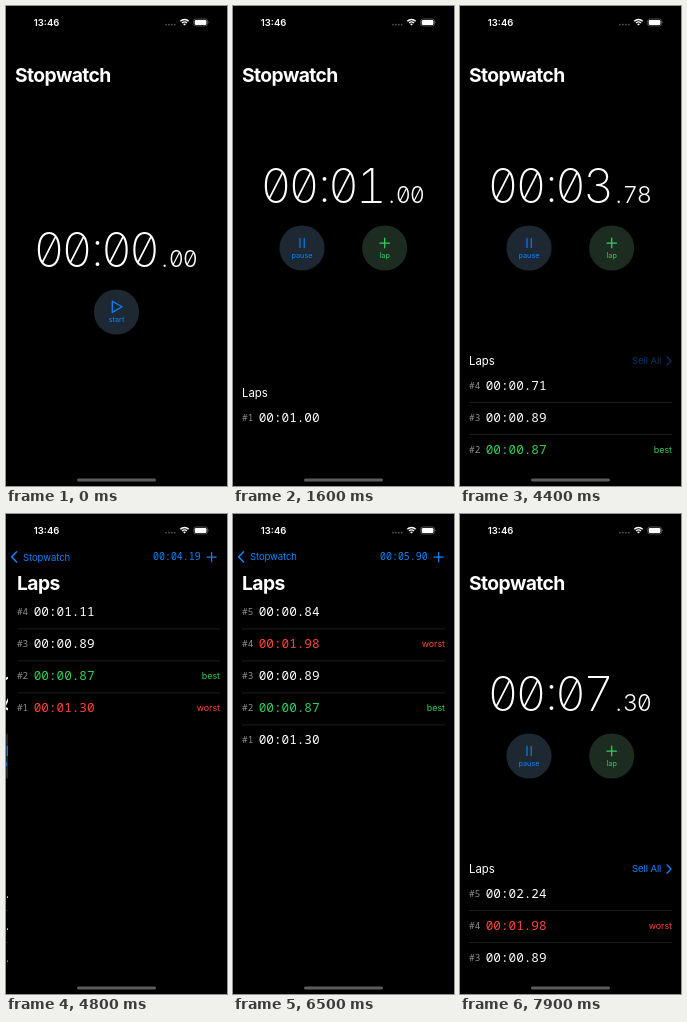
An HTML page for the animation above (8000 ms loop, 221 px wide and 480 px high).

```html
<!DOCTYPE html>
<html lang="en">
<head>
<meta charset="utf-8">
<title>Stopwatch</title>
<style>
  html, body { margin: 0; width: 100%; height: 100%; overflow: hidden; background: #000; }
  svg { display: block; width: 100%; height: 100%; }
  text { font-family: Inter, "Open Sans", sans-serif; fill: #fff; white-space: pre; }
  .mono { font-family: "Noto Sans Mono", "DejaVu Sans Mono", monospace; }
  .digit { text-anchor: middle; font-feature-settings: "zero", "tnum"; }
  .big { font-size: 48px; font-weight: 250; }
  .small { font-size: 23.4px; font-weight: 300; }
  .title { font-size: 19.3px; font-weight: 700; letter-spacing: -.03em; }
  .heading { font-size: 11.4px; }
  .body { font-size: 9.5px; letter-spacing: -.01em; }
  .label { font-size: 7.3px; text-anchor: middle; }
  .lap { font-size: 12.7px; }
  .index { font-size: 9.4px; fill: #8e8e93; }
  .tag { font-size: 8.9px; text-anchor: end; }
  .clock { font-size: 9.5px; font-weight: 600; }
  .blue { fill: #0a84ff; }
  .green { fill: #30d158; }
  .red { fill: #ff453a; }
  .line { fill: none; stroke-linecap: round; stroke-linejoin: round; stroke-width: 1.25; }
  .blueLine { stroke: #0a84ff; }
  .greenLine { stroke: #30d158; }
  .rule { stroke: #242426; stroke-width: .8; }
</style>
</head>
<body>
<svg id="stage" viewBox="0 0 221 480"></svg>
<script>
const WIDTH = 221, LOOP = 8000, STEP = 100;
const START = 600, PRESS_START = 500;
const PRESS_ALL = 4400, PUSH = 4430;
const PRESS_BACK = 6700, POP = 6770;

// Loop time against stopwatch reading, both in ms
const CLOCK = [[600, 0], [1600, 1005], [2800, 2181], [4400, 3786], [4800, 4192], [6500, 5902], [7900, 7302]];
const LAP_STARTS = [0, 1305, 2183, 3075, 5060];

const clamp = v => Math.min(1, Math.max(0, v));
const mix = (a, b, p) => a + (b - a) * p;
const easeInOut = p => p * p * (3 - 2 * p);
const pad = n => String(n).padStart(2, '0');

// Critically damped spring
function spring(ms) {
  const x = Math.max(0, ms) * 0.01826;
  return 1 - (1 + x) * Math.exp(-x);
}

function elapsedAt(t) {
  if (t <= START) return 0;
  const i = Math.max(1, CLOCK.findIndex(([time]) => t <= time));
  const [t0, e0] = CLOCK[i - 1], [t1, e1] = CLOCK[i];
  return mix(e0, e1, (t - t0) / (t1 - t0));
}

function format(ms) {
  const cs = Math.floor(ms / 10);
  return `${pad(Math.floor(cs / 6000))}:${pad(Math.floor(cs / 100) % 60)}.${pad(cs % 100)}`;
}

const text = (x, y, str, cls, extra = '') => `<text x="${x}" y="${y}" class="${cls}" ${extra}>${str}</text>`;
const line = (d, cls, extra = '') => `<path d="${d}" class="line ${cls}" ${extra}/>`;
const group = (body, x = 0, y = 0, opacity = 1, scale = 1) =>
  opacity <= 0 ? '' : `<g transform="translate(${x} ${y}) scale(${scale})" opacity="${opacity}">${body}</g>`;
const plus = (x, y, r, cls) => line(`M${x - r} ${y}h${2 * r}M${x} ${y - r}v${2 * r}`, cls);

// Newest lap first, with best and worst among the finished ones
function lapsAt(elapsed) {
  const laps = LAP_STARTS.filter(s => s <= elapsed).map((s, i) => {
    const end = LAP_STARTS[i + 1];
    const done = end <= elapsed;
    return { index: i + 1, time: (done ? end : elapsed) - s, done };
  });
  const times = laps.filter(l => l.done).map(l => l.time);
  if (times.length > 1) {
    for (const lap of laps.filter(l => l.done)) {
      if (lap.time === Math.min(...times)) Object.assign(lap, { tag: 'best', color: 'green' });
      if (lap.time === Math.max(...times)) Object.assign(lap, { tag: 'worst', color: 'red' });
    }
  }
  return laps.reverse();
}

function lapRows(laps, top) {
  return laps.map((lap, i) => {
    const y = top + i * 32;
    const color = lap.color || '';
    return text(9, y + 3.4, '#' + lap.index, 'mono index') +
      text(25.7, y + 4.6, format(lap.time), `mono lap ${color}`) +
      (lap.tag ? text(212, y + 3.2, lap.tag, `tag ${color}`) : '') +
      (i ? `<path class="rule" d="M9 ${y - 14.7}H212"/>` : '');
  }).join('');
}

function readout(elapsed, baseline) {
  const [main, cents] = format(elapsed).split('.');
  const mainX = [43, 71, 91.5, 110.5, 138.5];
  const digits = [...main].map((c, i) => text(mainX[i], baseline - (c === ':' ? 1.5 : 0), c, 'digit big'));
  const tail = [...('.' + cents)].map((c, i) => text([158.7, 170.3, 184.3][i], baseline, c, 'digit small'));
  return digits.concat(tail).join('');
}

function button(x, y, fill, icon, label, color, pressed) {
  const disc = `<circle r="22.6" fill="${fill}" opacity="${pressed ? .8 : 1}"/>`;
  return group(disc + group(icon + text(0, 10, label, `label ${color}`), 0, 0, pressed ? .5 : 1), x, y);
}

const ICONS = {
  start: line('M-4.2-10.8L5.6-5.2L-4.2.4Z', 'blueLine'),
  pause: line('M-2-9.6v9M2.2-9.6v9', 'blueLine', 'style="stroke-width:1.1"'),
  lap: plus(0, -5, 4.8, 'greenLine')
};

function mainPage(t, elapsed, laps, lapPressed) {
  const p = easeInOut(clamp((t - START) / 400));
  const lift = -64 * p;
  const n = Math.min(laps.length, 3);
  let list = '';
  if (n && t >= START) {
    list = text(9, 407.2 - 16 * n, 'Laps', 'heading') + lapRows(laps.slice(0, 3), 427.3 - 16 * n);
    if (laps.length > 3) {
      const link = text(172, 358.4, 'Sell All', 'body blue') + line('M207 350.8l4 4.2l-4 4.2', 'blueLine');
      list += group(link, 0, 0, t === PRESS_ALL ? .4 : 1);
    }
  }
  const running = button(69, 306, '#1d2833', ICONS.pause, 'pause', 'blue', false) +
    button(151.7, 306, '#1d2c21', ICONS.lap, 'lap', 'green', lapPressed);
  const idle = button(110.5, 306, '#1d2833', ICONS.start, 'start', 'blue', t >= PRESS_START);
  return readout(elapsed, 261.3 + lift) +
    group(idle, 0, lift, 1 - p) + group(running, 0, lift, p) + group(list, 0, 110 * (1 - p));
}

function navBar(t, elapsed, p, lapPressed) {
  // The large title shrinks into the back label
  const x = mix(9, 17, p), y = mix(75.6, 46.3, p);
  const fade = t === PRESS_BACK ? .4 : 1;
  return group(text(0, 0, 'Stopwatch', 'title'), x, y, clamp(1 - p * 1.6), mix(1, .49, p)) +
    group(text(0, 0, 'Stopwatch', 'body blue'), x, y, clamp(p * 1.6 - .6) * fade, mix(2.04, 1, p)) +
    group(line('M10.6 37.8l-5 5.1l5 5.1', 'blueLine', 'style="stroke-width:1.5"'), 0, 0, p * fade) +
    group(text(9, 75.6, 'Laps', 'title'), WIDTH * (1 - p), 0, p) +
    group(text(147, 46.4, format(elapsed), 'mono blue', 'font-size="9.95"'), 0, 0, p) +
    group(plus(205.6, 43, 4.6, 'blueLine'), 0, 0, p * (lapPressed ? .4 : 1));
}

function statusBar() {
  const arc = r => `M${178.5 - r * .72} ${19.3 - r * .7}A${r} ${r} 0 0 1 ${178.5 + r * .72} ${19.3 - r * .7}`;
  const dots = [0, 1, 2, 3].map(i => `<circle cx="${160 + i * 2.9}" cy="18.6" r=".9" fill="#555"/>`).join('');
  return text(27.8, 19.8, '13:46', 'clock') + dots +
    `<path d="${arc(5.8)}${arc(3.4)}" fill="none" stroke="#fff" stroke-width="1.4"/>` +
    '<path d="M178.5 19.6l-1.5-1.6q1.5-1.2 3 0z" fill="#fff"/>' +
    '<rect x="187.8" y="13" width="13.6" height="6.9" rx="2" fill="none" stroke="#777" stroke-width=".7"/>' +
    '<rect x="188.8" y="14" width="11.6" height="4.9" rx="1.2" fill="#fff"/>' +
    '<path d="M202.2 15.2q1.2 1.2 0 2.4z" fill="#777"/>';
}

function scene(t) {
  const elapsed = elapsedAt(t);
  const laps = lapsAt(elapsed);
  const lapPressed = LAP_STARTS.some(s => s > elapsed && s - elapsed < 100 && t > START);
  const p = t < POP ? spring(t - PUSH) : 1 - spring(t - POP);
  const lapsPage = `<rect width="${WIDTH}" height="480"/>` + lapRows(laps, 97.6);
  return group(mainPage(t, elapsed, laps, lapPressed), -.3 * WIDTH * p) +
    (p > .001 ? group(lapsPage, WIDTH * (1 - p)) : '') +
    navBar(t, elapsed, p, lapPressed) + statusBar() +
    '<rect x="71" y="472.6" width="79" height="3" rx="1.5" fill="#5c5c5e"/>';
}

const stage = document.getElementById('stage');
const origin = performance.now();
let shown = -1;

function draw() {
  const t = Math.floor(((performance.now() - origin) % LOOP) / STEP) * STEP;
  if (t !== shown) stage.innerHTML = scene(shown = t);
  requestAnimationFrame(draw);
}
draw();
</script>
</body>
</html>
```
